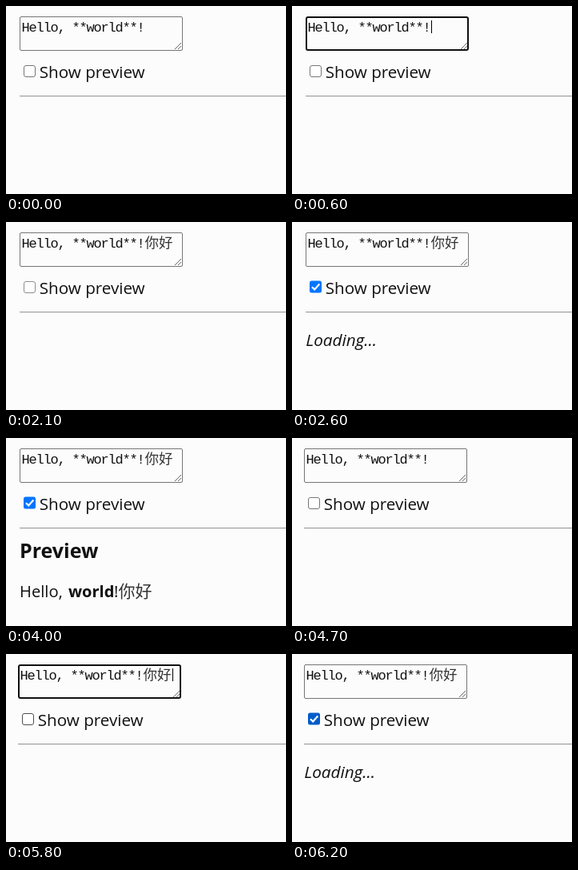
Write an HTML page with a canvas that moves like this. It is 350x235 px and loops after 8 s.

```html
<!DOCTYPE html>
<html lang="en">
<head>
<meta charset="utf-8">
<title>Show preview</title>
<style>
  html, body { margin: 0; width: 100%; height: 100%; overflow: hidden; background: #fcfcfc; }
  canvas { display: block; width: 350px; height: 235px; }
</style>
</head>
<body>
<canvas id="stage" width="350" height="235"></canvas>
<script>
const ctx = document.getElementById('stage').getContext('2d');
const LOOP = 8000;
const PAPER = '#fcfcfc';
const SANS = '"Open Sans", "Noto Sans", sans-serif';
const MONO = '"Liberation Mono", monospace';
const CJK = '"Noto Sans CJK SC", "Noto Sans CJK", sans-serif';

const idle = { x: 0, area: 'idle', caret: false, typed: false, box: 'idle', checked: false, panel: '' };

// Each step changes part of the state and holds until the next one.
const steps = [
  [0, idle],
  [300, { area: 'hover' }],
  [600, { area: 'focus', caret: true }],
  [1100, { caret: false }],
  [1300, { typed: true, caret: true }],
  [1600, { box: 'hover' }],
  [1800, { caret: false }],
  [2100, { area: 'idle', box: 'active' }],
  [2200, { box: 'hover', checked: true, panel: 'loading' }],
  [2600, { box: 'idle' }],
  [4000, { panel: 'preview' }],
  [4700, { ...idle, x: -2 }],
  [4900, { area: 'hover' }],
  [5100, { area: 'focus', caret: true }],
  [5600, { caret: false }],
  [5700, { typed: true, caret: true }],
  [5800, { box: 'hover' }],
  [6000, { caret: false }],
  [6100, { area: 'idle', box: 'active' }],
  [6200, { box: 'hover', checked: true, panel: 'loading' }]
];

function stateAt(time) {
  return Object.assign({}, ...steps.filter(([at]) => at <= time).map(([, change]) => change));
}

function text(str, x, y, font, { color = '#111', spacing = 0 } = {}) {
  ctx.font = font;
  ctx.letterSpacing = `${spacing}px`;
  ctx.fillStyle = color;
  ctx.fillText(str, x, y);
}

function line(color, width, ...points) {
  ctx.strokeStyle = color;
  ctx.lineWidth = width;
  ctx.beginPath();
  points.forEach(([x, y]) => ctx.lineTo(x, y));
  ctx.stroke();
}

function roundBox(x, y, w, h, r, fill, stroke, width = 1) {
  ctx.beginPath();
  ctx.roundRect(x, y, w, h, r);
  ctx.fillStyle = fill;
  ctx.fill();
  if (stroke) {
    ctx.strokeStyle = stroke;
    ctx.lineWidth = width;
    ctx.stroke();
  }
}

function drawTextarea(s) {
  if (s.area === 'focus') {
    roundBox(18, 14, 202, 41, 2, PAPER, '#101010', 2);
  } else {
    roundBox(17.5, 13.5, 203, 42, 1.5, PAPER, s.area === 'hover' ? '#4f4f4f' : '#767676');
  }
  line('#6a6a6a', 1, [211, 54], [219, 46]);
  line('#6a6a6a', 1, [215, 54], [219, 50]);

  // Tightened to a 9px column grid.
  text('Hello, **world**!', 19.5, 32, `17px ${MONO}`, { spacing: -1.2 });
  if (s.typed) text('你好', 173.5, 32, `300 17.5px ${CJK}`, { color: '#333' });
  if (s.caret) {
    ctx.fillStyle = '#000';
    ctx.fillRect(s.typed ? 210 : 174, 18, 1, 16);
  }
}

function drawCheckbox(s) {
  if (s.checked) {
    roundBox(22, 73.5, 15, 15, 2.5, s.box === 'hover' ? '#005cc8' : '#0075ff');
    line('#fff', 2.2, [25, 81.3], [28.2, 84.5], [34.3, 77.5]);
  } else {
    const border = { idle: '#767676', hover: '#4f4f4f', active: '#8d8d8d' }[s.box];
    roundBox(22.5, 74.5, 14, 14, 2.5, '#fff', border);
  }
  text('Show preview', 41.8, 90, `20.6px ${SANS}`);
}

function drawPanel(s) {
  ctx.fillStyle = '#9a9a9a';
  ctx.fillRect(17, 112, 340, 1);
  ctx.fillStyle = '#eee';
  ctx.fillRect(18, 113, 340, 1);

  if (s.panel === 'loading') {
    text('Loading...', 17.3, 155, `italic 20.8px ${SANS}`);
  } else if (s.panel === 'preview') {
    text('Preview', 17, 150, `bold 25px ${SANS}`);
    text('Hello, ', 17, 199, `20.2px ${SANS}`);
    text('world', 78, 199, `bold 20px ${SANS}`);
    text('!', 135, 199, `20.2px ${SANS}`);
    text('你好', 140.5, 199, `300 21px ${CJK}`, { color: '#333' });
  }
}

function draw(time) {
  const s = stateAt(time);
  ctx.fillStyle = PAPER;
  ctx.fillRect(0, 0, 350, 235);
  ctx.save();
  ctx.translate(s.x, 0);
  drawTextarea(s);
  drawCheckbox(s);
  drawPanel(s);
  ctx.restore();
}

const start = performance.now();
function tick() {
  draw((performance.now() - start) % LOOP);
  requestAnimationFrame(tick);
}
tick();
</script>
</body>
</html>
```
